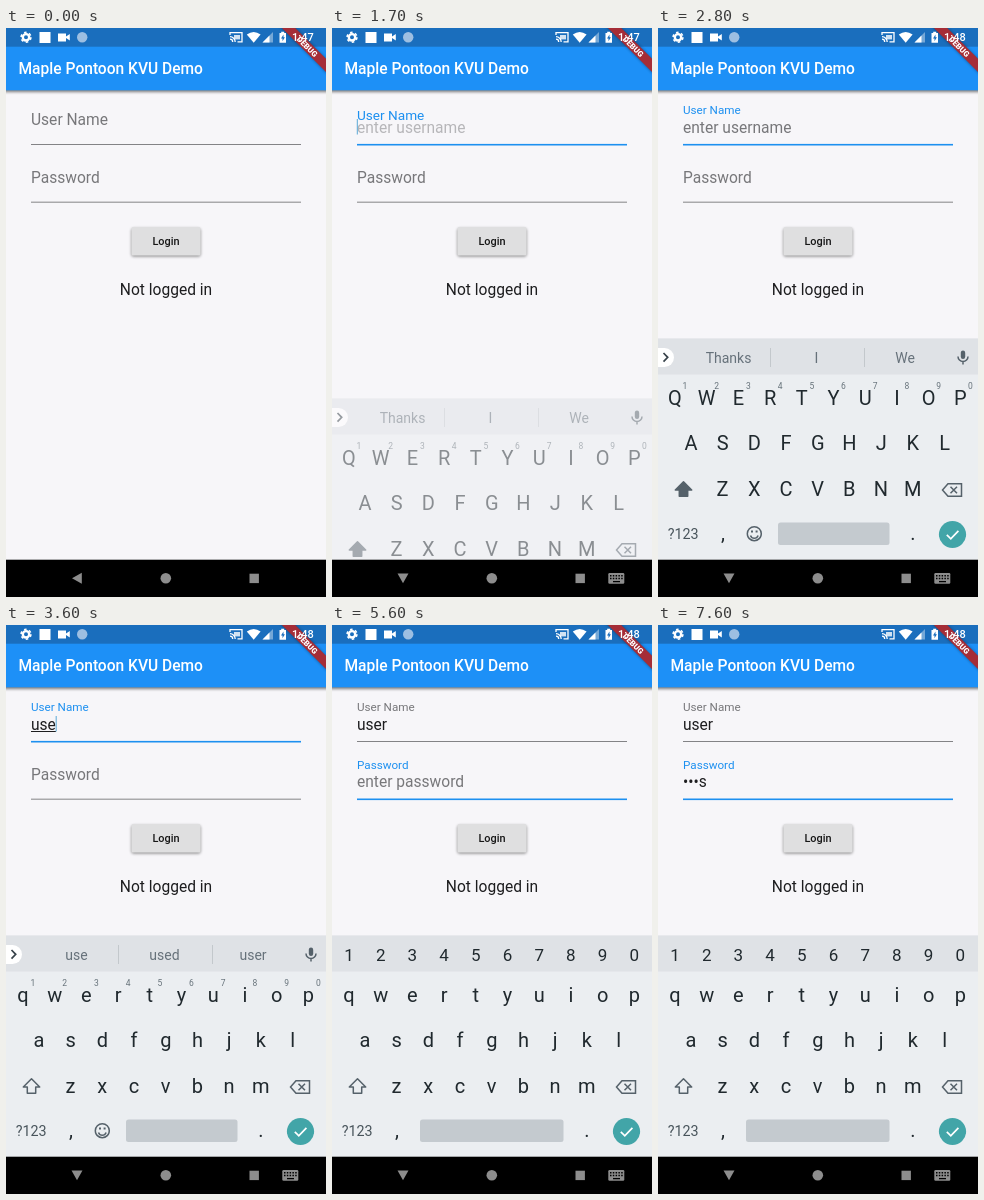
These frames come from a looping animation (320 by 569 pixels, 8 s). An HTML page:

```html
<!DOCTYPE html>
<html lang="en">
<head>
<meta charset="utf-8">
<title>Login form</title>
<style>
  html, body { margin: 0; width: 100%; height: 100%; overflow: hidden; background: #f7f6f9; }
  svg { display: block; width: 320px; height: 569px; font-family: Roboto, sans-serif; }
  .mid { text-anchor: middle; }
  .key { font-size: 20px; fill: #20292e; }
  .icon { fill: none; stroke: #55616a; stroke-width: 1.5; }
</style>
</head>
<body>
<svg id="stage" viewBox="0 0 320 569">
  <defs>
    <filter id="soft" x="-20%" y="-60%" width="140%" height="220%"><feGaussianBlur stdDeviation="1.6"/></filter>
  </defs>
  <rect width="320" height="569" fill="#f7f6f9"/>

  <!-- app bar -->
  <rect x="-5" y="30" width="330" height="34" fill="#000" opacity=".5" filter="url(#soft)"/>
  <rect width="320" height="62.3" fill="#1d90f7"/>
  <rect width="320" height="18.7" fill="#1a6ebd"/>
  <text x="12.5" y="46" font-size="15.57" font-weight="500" fill="#fff">Maple Pontoon KVU Demo</text>

  <!-- form -->
  <g id="form"></g>
  <rect x="125.5" y="200.5" width="69" height="28" rx="2" opacity=".45" filter="url(#soft)"/>
  <rect x="125.5" y="199" width="69" height="28.5" rx="1.6" fill="#dfdfe0"/>
  <text class="mid" x="160" y="217" font-size="10.9" font-weight="500" fill="#161616">Login</text>
  <text class="mid" x="160" y="266.8" font-size="15.57" fill="#1d1d1f">Not logged in</text>

  <!-- debug ribbon -->
  <g transform="translate(320 0) rotate(45)">
    <rect x="-40" y="21.8" width="80" height="9.34" opacity=".4" filter="url(#soft)"/>
    <rect x="-40" y="21.8" width="80" height="9.34" fill="#a52d37"/>
    <text class="mid" y="29.3" font-size="7.9" font-weight="900" fill="#fff">DEBUG</text>
  </g>

  <!-- status bar -->
  <g fill="#fff">
    <circle cx="20" cy="9.3" r="3.2" fill="none" stroke="#fff" stroke-width="2.4"/>
    <circle cx="20" cy="9.3" r="4.9" fill="none" stroke="#fff" stroke-width="1.6" stroke-dasharray="2.6 2.53"/>
    <rect x="33.5" y="4" width="11" height="11"/>
    <path d="M52 5.5h8v3l3.8-2.5v6.6L60 10v3.4h-8z"/>
    <circle cx="76.2" cy="9.3" r="5.2" fill="#9dbfe2"/>
    <path d="M224 7V4.7h12v9.2h-4.5M224 8.7a5.2 5.2 0 0 1 5.2 5.2M224 11.2a2.7 2.7 0 0 1 2.7 2.7" fill="none" stroke="#fff" stroke-width="1.3"/>
    <rect x="228" y="7" width="6" height="4.4" opacity=".8"/>
    <path d="M240.8 6.6q6.9-5 13.8 0L247.700 14.800z"/>
    <path d="M267 4v10.500H256.500z" opacity=".4"/>
    <path d="M263.500 7.500v7H256.500z"/>
    <path d="M273.500 5h1.700v-1.300h3V5h1.800v9.800h-6.500z"/>
    <path d="M277.500 6.500l-2.500 4h1.500v2.800l2.400-4h-1.400z" fill="#1a6ebd"/>
    <text id="clock" x="286" y="13.400" font-size="11" font-weight="500"></text>
  </g>

  <!-- keyboard -->
  <g id="board">
    <rect y="310.500" width="320" height="240" fill="#ebeef1"/>
    <rect y="310.500" width="320" height="36" fill="#dfe2e6"/>
    <g id="strip">
      <rect x="-12" y="320" width="28" height="19" rx="9.500" fill="#fff"/>
      <path d="M5.500 325l4.200 4.300-4.200 4.300" fill="none" stroke="#37424a" stroke-width="1.700"/>
      <path d="M112.500 320v19M206.500 320v19" stroke="#c3c8cc"/>
      <rect x="302.800" y="322.500" width="4.400" height="8.500" rx="2.200" fill="#55616a"/>
      <path class="icon" stroke-width="1.300" d="M300 328.500a5 5 0 0 0 10 0M305 333.500v3"/>
    </g>
    <g id="letters"></g>
    <path id="shift" class="icon" d="M25.500 453.800l8.200 8.200h-4v6.300h-8.400V462h-4z" stroke-linejoin="round"/>
    <path class="icon" d="M290 455.700h13.500v12.600H290l-5.500-6.300zM292.500 458.800l6.500 6.500M299 458.800l-6.500 6.500"/>
    <text class="mid" x="25.200" y="511" font-size="14.300" fill="#48545b">?123</text>
    <text class="mid key" x="65" y="512">,</text>
    <text class="mid key" x="255" y="512">.</text>
    <g id="smiley">
      <circle class="icon" cx="96.300" cy="505.700" r="7" stroke-width="1.300"/>
      <path class="icon" d="M92.500 507.500a4 4 0 0 0 7.600 0" stroke-width="1.300"/>
      <path d="M93 502.500h2v2h-2zM97.600 502.500h2v2h-2z" fill="#55616a"/>
    </g>
    <rect id="space" y="494.500" height="22.500" rx="2.500" fill="#c4cacf"/>
    <circle cx="294.500" cy="506.500" r="13.600" fill="#42a5a8"/>
    <path d="M288.800 506.800l4 4 7.600-8" fill="none" stroke="#fff" stroke-width="1.700"/>
  </g>

  <!-- navigation bar -->
  <rect y="531.700" width="320" height="38" fill="#000"/>
  <g fill="#8d8d8d">
    <path id="back" d="M66 550.300l9.800-5.500v11z"/>
    <circle cx="159.800" cy="550.300" r="5.300"/>
    <rect x="243.500" y="545.700" width="9.400" height="9.400"/>
    <g id="switcher">
      <rect x="276.300" y="545" width="16" height="10.800" rx="1.200"/>
      <path d="M278 547.800h13M278 550.600h13" stroke="#000" stroke-width="1.500" stroke-dasharray="1.500 1.300"/>
      <path d="M281 553.600h7" stroke="#000" stroke-width="1.300"/>
    </g>
  </g>
</svg>
<script>
const LOOP = 8000, BLUE = '#1d90f0', GREY = '#77777a', PITCH = 31.7;
const $ = id => document.getElementById(id);

function make(tag, parent, attrs, text = '') {
  const el = document.createElementNS('http://www.w3.org/2000/svg', tag);
  set(el, attrs);
  el.textContent = text;
  return parent.appendChild(el);
}
function set(el, attrs) {
  for (const k in attrs) el.setAttribute(k, attrs[k]);
}
const show = (el, on) => el.setAttribute('visibility', on ? 'visible' : 'hidden');
const write = (el, s) => { if (el.textContent !== s) el.textContent = s; };

// Value of the last [time, value] step reached
const at = (steps, t) => steps.reduce((v, [from, next]) => t >= from ? next : v, steps[0][1]);

function makeField(y, name, prompt) {
  const form = $('form');
  const line = make('rect', form, { x: 25, width: 270 });
  const label = make('text', form, { 'font-size': 15.57 }, name);
  const hint = make('text', form, { x: 25, y: y + 104.6, 'font-size': 15.57, fill: GREY }, prompt);
  const value = make('text', form, { x: 25, y: y + 104.6, 'font-size': 15.57, fill: '#1d1d1f' });
  const compose = make('rect', form, { x: 25, y: y + 106, height: 1, fill: '#1d1d1f' });
  const caret = make('rect', form, { y: y + 91, width: 1, height: 15.5, fill: '#5aa9d6' });
  return ({ text, float, focus, blink, composing }) => {
    write(value, text);
    const width = text ? value.getComputedTextLength() : 0;
    const color = focus ? BLUE : GREY;
    set(label, { fill: color, transform: `translate(25 ${y + 97 - 11 * float}) scale(${1 - float / 4})` });
    set(hint, { opacity: text ? 0 : float });
    set(line, { y: y + (focus ? 115.9 : 116.1), height: focus ? 1.6 : .9, fill: color });
    set(compose, { width });
    set(caret, { x: 24.8 + width });
    show(compose, composing && text);
    show(caret, blink);
  };
}
const userField = makeField(0, 'User Name', 'enter username');
const passField = makeField(57.6, 'Password', 'enter password');

const rows = [['qwertyuiop', 17, 376.5], ['asdfghjkl', 33, 422], ['zxcvbnm', 64.5, 467.5]];
const keys = rows.flatMap(([chars, x, y]) => [...chars].map((c, i) =>
  [c, make('text', $('letters'), { class: 'mid key', x: x + i * PITCH, y })]));
const digits = [...'1234567890'].map((d, i) => [
  make('text', $('letters'), { class: 'mid', x: 27 + i * PITCH, y: 360.5, 'font-size': 8.5, fill: '#66727a' }, d),
  make('text', $('letters'), { class: 'mid', x: 17 + i * PITCH, y: 336, 'font-size': 17, fill: '#20292e' }, d)
]);
const words = [70.5, 158.5, 247].map(x =>
  make('text', $('strip'), { class: 'mid', x, y: 334.5, 'font-size': 14, fill: '#66717a' }));

const userText = [[0, ''], [3200, 'u'], [3400, 'us'], [3600, 'use'], [3800, 'user']];
const passText = [[0, ''], [6500, 'p'], [6700, '•a'], [6900, '••s'], [7100, '•••s']];
const userBlink = [[0, 0], [1400, 1], [1900, 0], [2300, 1], [2800, 0], [3200, 1], [4300, 0], [4800, 1], [5300, 0]];
const passBlink = [[0, 0], [5300, 1], [5600, 0], [6100, 1], [7600, 0]];
const slide = [[0, 60], [1800, 6], [1900, 2], [2000, 0]];
const guesses = {
  '': 'Thanks I We', u: 'u you up', us: 'us use just', use: 'use used user', user: 'user users used'
};

function draw(t) {
  const typed = at(userText, t), secret = t >= 5100, lower = typed !== '', open = t >= 1300;
  write($('clock'), t < 2300 ? '1:47' : '1:48');
  userField({
    text: typed, float: at([[0, 0], [1700, .5], [1800, 1]], t),
    focus: t >= 1700 && t < 5300, blink: at(userBlink, t), composing: !secret
  });
  passField({
    text: at(passText, t), float: at([[0, 0], [5300, .5], [5400, 1]], t),
    focus: t >= 5300, blink: at(passBlink, t), composing: false
  });

  const board = $('board');
  board.style.display = t < 1700 ? 'none' : '';
  set(board, { transform: `translate(0 ${at(slide, t)})`, opacity: at([[0, .5], [1800, .92], [1900, 1]], t) });
  keys.forEach(([c, el]) => write(el, lower ? c : c.toUpperCase()));
  digits.forEach(([small, large]) => { show(small, !secret); show(large, secret); });
  $('strip').style.display = $('smiley').style.display = secret ? 'none' : '';
  guesses[typed].split(' ').forEach((w, i) => write(words[i], w));
  $('shift').style.fill = lower ? 'none' : '#55616a';
  set($('space'), secret ? { x: 88, width: 143.5 } : { x: 120, width: 111.5 });

  set($('back'), { transform: `rotate(${at([[0, 0], [1300, -45], [1400, -90]], t)} 71 550.3)` });
  show($('switcher'), open);
}

const start = performance.now();
let last = -1;
function tick() {
  const t = Math.floor((performance.now() - start) % LOOP / 100) * 100;
  if (t !== last) draw(last = t);
  requestAnimationFrame(tick);
}
tick();
</script>
</body>
</html>
```
